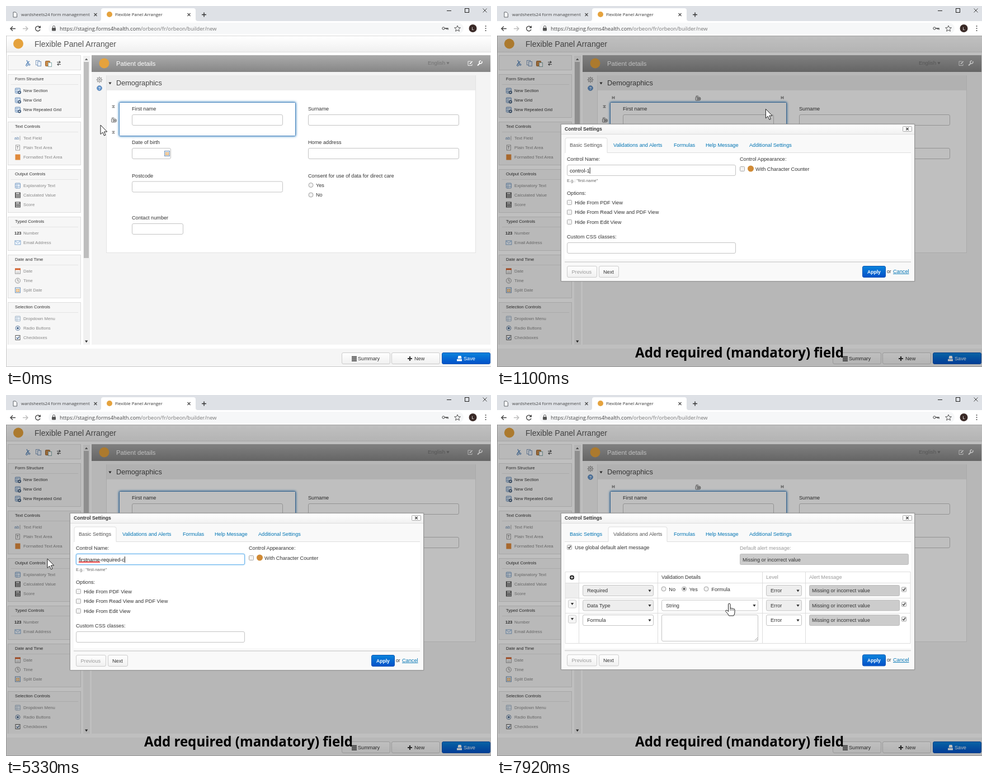
An HTML page that plays this animation: 867 px wide and 646 px high, repeating every 7990 ms.

```html
<!DOCTYPE html>
<html lang="en">
<head>
<meta charset="utf-8">
<title>Form builder</title>
<style>
html, body { margin: 0; width: 867px; height: 646px; overflow: hidden; background: #fff }
svg { display: block; font-family: "Liberation Sans", Arial, sans-serif; white-space: pre }
.ui { font-family: "Open Sans", "Noto Sans", sans-serif }
</style>
</head>
<body>
<svg id="stage" width="867" height="646" viewBox="0 0 867 646"></svg>
<script>
const LOOP = 7990, BODY = 9.16, SMALL = 7.75;
const APP = 'Flexible Panel Arranger', NAME = 'firstname-required-control';

// Drawing helpers; text is placed by its vertical centre.
const text = (x, y, s, size = BODY, fill = '#333', more = '') =>
  `<text x="${x}" y="${y + size * .36}" font-size="${size}" fill="${fill}" ${more}>${s}</text>`;
const rect = (x, y, w, h, fill, stroke = 'none', r = 0, more = '') => {
  const o = stroke === 'none' ? 0 : .5;
  return `<rect x="${x + o}" y="${y + o}" width="${w - 2 * o}" height="${h - 2 * o}" rx="${r}" fill="${fill}" stroke="${stroke}" ${more}/>`;
};
const circle = (x, y, r, fill, stroke = 'none') =>
  `<circle cx="${x}" cy="${y}" r="${r}" fill="${fill}" stroke="${stroke}"/>`;
const path = (d, stroke = '#333', w = 1, fill = 'none', more = '') =>
  `<path d="${d}" stroke="${stroke}" stroke-width="${w}" fill="${fill}" ${more}/>`;
const group = (id, s, more = '') => `<g id="${id}" ${more}>${s}</g>`;
const at = (x, y, s) => `<g transform="translate(${x} ${y})">${s}</g>`;

const input = (x, y, w, h = 20, fill = '#fff') => rect(x, y, w, h, fill, '#c4c4c4', 2.5);
const radio = (x, y) => circle(x, y, 4, '#f2f2f2', '#a3a3a3');
const check = (x, y, on) => rect(x - 4, y - 4, 9, 9, '#f3f3f3', '#a9a9a9', 1) +
  (on ? path(`M${x - 2} ${y + .5}l2 2 3-4.5`, '#444', 1.4) : '');
const down = (x, y, c = '#333') => path(`M${x - 2.6} ${y - 1.5}h5.2l-2.6 4z`, 'none', 0, c);
const select = (x, y, w, label, fill = '#fff') =>
  input(x, y, w, 20, fill) + text(x + 8, y + 10, label) + down(x + w - 7, y + 10);
const button = (x, y, w, label, tx, fill = '#333', more = '') =>
  rect(x, y, w, 21, 'url(#light)', '#ccc', 2.5) + text(tx, y + 10.5, label, BODY, fill, more);
const blueButton = (x, y, w, label, tx, size, more) =>
  rect(x, y, w, 21, 'url(#blue)', '#0a55b5', 2.5) + text(tx, y + 10.5, label, size, '#fff', more);
const cross = (x, y, r, w = 1.1) => path(`M${x - r} ${y - r}l${2 * r} ${2 * r}M${x + r} ${y - r}l${-2 * r} ${2 * r}`, '#444', w);

// Small icons, centred on 0,0.
const sheet = (c = '#6b8fb8') => rect(-5, -5, 10, 10, '#eaf2fb', c, 1) + path('M-5-2.5H5M-1.5-2.5V5M-5 1.5H5', c, .8);
const plusSheet = sheet() + circle(3, 3, 3, '#3d5878') + path('M1.5 3h3M3 1.5v3', '#fff', .9);
const calc = rect(-5, -5, 10, 10, '#666', '#555') + path('M-3-3H3', '#fff', 1.5) + path('M-3 0H4M-3 3H4', '#eee', 1.4, 'none', 'stroke-dasharray="1.6 1"');
const clock = circle(0, 0, 4.5, '#eee', '#999') + path('M0-3V0L2 1.5', '#777', .9);
const calendar = rect(-5, -5, 10, 10, '#fff', '#999') + rect(-5, -5, 10, 3, '#d8642f') + path('M-3 1H3M-3 3H3', '#bbb', .9);
const split = rect(-5, -5, 10, 10, '#dbe9f7', '#7895b4') + rect(-3, -2, 6, 5, '#e6a657') + path('M0-2V3M-3 .5H3', '#fff', .8);
const gear = circle(0, 0, 3.6, '#ddd', '#999') + path('M0-5.5V5.5M-5.5 0H5.5M-4-4L4 4M4-4L-4 4', '#999', 1.3) + circle(0, 0, 2.7, '#e4e4e4') + circle(0, 0, 1.4, '#999');
const bin = rect(-4.5, -2.5, 6, 7, '#eee', '#777', 1) + path('M-3-2.5V-4H1', '#777') + circle(2, 1, 3, '#ccc', '#777') + path('M.5 1h3');
const handle = path('M-2.5-1.8H2.5M-2.5 1.8H2.5', '#666', 1.1) + path('M-1.5-1L1.5 1M1.5-1L-1.5 1', '#888', .8);
const turned = '<g transform="rotate(90)">' + handle + '</g>';
const marks = {
  abc: text(-6, 0, 'ab', 7.5, '#5f83ad') + path('M4-4V4', '#999', .8),
  letter: rect(-4, -5, 8, 10, '#fff', '#999') + text(-2.2, 0, 'T', 7, '#444'),
  square: rect(-4.5, -5, 9, 10, '#e08a3c'),
  digits: text(-6, 0, '123', 7.5, '#333', 'font-weight="bold"'),
  mail: rect(-5.5, -4, 11, 8, '#f2f8ff', '#85a9ce') + path('M-5-3.5L0 1L5-3.5', '#85a9ce'),
  dot: circle(0, 0, 4, '#fff', '#5e7ca0') + circle(0, 0, 2, '#46688f'),
  tick: rect(-4.5, -4.5, 9, 9, '#fff', '#555') + path('M-2 0l2 2 2.5-4', '#3c5f8c', 1.4)
};

function browser() {
  return rect(0, 0, 867, 27, '#dee1e6') + path('M166 27q4 0 4-4V8q0-4 4-4H335q4 0 4 4V23q0 4 4 4z', 'none', 0, '#fff') +
    rect(0, 27, 867, 26, '#fff') + rect(76, 30, 742, 20, '#f6f7f8', 'none', 10) + rect(0, 53, 867, 1, '#d8d8d8') +
    path('M13 11h4l2.5 2.5V20h-6.5z', '#5f6368', 1, '#fff') +
    text(27, 15.5, 'wardsheets24 form management', 7.9, '#444', 'class="ui"') + cross(160, 15.5, 2.5) +
    circle(185, 15, 5, '#e5a23d') + text(195, 15.5, APP, 7.9, '#333', 'class="ui"') + cross(327, 15.5, 2.5) +
    path('M350 15.5h8M354 11.5v8', '#333', 1.4) + path('M788 8.5h8', '#222') + rect(820, 4, 8, 8, 'none', '#222') + cross(856, 8, 3.5, 1) +
    path('M17 40.5H8M12 36.5l-4 4 4 4', '#444', 1.4) + path('M30 40.5h9M35 36.5l4 4-4 4', '#bbb', 1.3) +
    path('M60.5 38A4.3 4.3 0 1 0 61 42', '#444', 1.4) + path('M62 35v4.5h-4.5z', 'none', 0, '#444') +
    rect(82, 39, 7, 5.5, '#555', 'none', 1) + path('M83.5 39v-1.5a2 2 0 0 1 4 0V39', '#555') +
    text(96, 40.5, 'https://staging.forms4health.com<tspan fill="#777">/orbeon/fr/orbeon/builder/new</tspan>', 9.29, '#444', 'class="ui"') +
    circle(782, 40, 2.2, 'none', '#444') + path('M784 40h6v2.5M787.5 40v2', '#444', 1.4) +
    path('M807 35l1.5 3.6 3.9.3-3 2.5 1 3.8-3.4-2-3.4 2 1-3.8-3-2.5 3.9-.3z', '#555') +
    circle(834.5, 40, 7, '#3a2a27') + text(832.4, 40, 'L', 7.5, '#fff') + [36, 40, 44].map(y => circle(857.5, y, 1.1, '#555')).join('');
}

function panel(y, h, title, items, fill = '#888') {
  return rect(3, y, 131, h, '#f6f6f6', '#dedede') + text(16, y + 8.5, title, SMALL) + rect(9, y + 18, 120, 1, '#e4e4e4') +
    items.map(([s, icon], i) => at(21, y + 29.5 + i * 17, icon) + text(31, y + 29 + i * 17, s, SMALL, fill)).join('');
}

function sidebar() {
  return rect(3, 88, 131, 27, '#f6f6f6', '#dedede') +
    path('M37 97l4 8M41.5 99l-5 5', '#4f7fb5', 1.3) + circle(37, 106, 1.5, 'none', '#4f7fb5') + circle(41.5, 105, 1.5, 'none', '#4f7fb5') +
    rect(53, 97, 7, 9, '#fff', '#7d99bc') + rect(56, 99, 7, 9, '#e8f0fa', '#7d99bc') +
    rect(70, 98, 9, 10, '#c98b4a', '#94602c', 1) + rect(75, 101, 7, 8, '#fff', '#8aa') +
    path('M91 100.5h6M95 98.5l2 2-2 2M98 104.5h-6M94 102.5l-2 2 2 2', '#555', 1.2) +
    panel(122, 78, 'Form Structure', [['New Section', plusSheet], ['New Grid', plusSheet], ['New Repeated Grid', plusSheet]], '#333') +
    panel(207, 78, 'Text Controls', [['Text Field', marks.abc], ['Plain Text Area', marks.letter], ['Formatted Text Area', marks.square]]) +
    panel(292, 78, 'Output Controls', [['Explanatory Text', sheet('#7fa0c4')], ['Calculated Value', calc], ['Score', calc]]) +
    panel(377, 61, 'Typed Controls', [['Number', marks.digits], ['Email Address', marks.mail]]) +
    panel(445, 78, 'Date and Time', [['Date', calendar], ['Time', clock], ['Split Date', split]]) +
    panel(530, 90, 'Selection Controls', [['Dropdown Menu', sheet('#a8b8c8')], ['Radio Buttons', marks.dot], ['Checkboxes', marks.tick]]) +
    rect(0, 606, 153, 14, '#fff') + rect(138, 89, 12, 517, '#f1f1f1') + rect(139, 100, 9, 351, '#bdbdbd') +
    path('M141 97l2.7-3.5 2.7 3.5z', 'none', 0, '#666') + down(143.7, 600);
}

const field = (x, y, label, w = 270) => text(x, y, label) + input(x, y + 10, w);

function form() {
  return rect(0, 54, 867, 28, 'url(#light)') + rect(0, 82, 867, 1, '#ddd') + circle(22, 67.5, 9, '#e5a23d') +
    text(51, 67.5, APP, 14.05, '#555') + sidebar() +
    rect(153, 88, 713, 518, '#f4f4f4') + rect(153, 88, 713, 30, 'url(#head)') + circle(175.5, 102.5, 9, '#e5a23d') +
    text(197, 102.5, 'Patient details', 11.2, '#fff') + text(754, 101.5, 'English', BODY + .3, '#727272') + down(790, 102, '#727272') +
    path('M831 99h-5v7.5h7v-3', '#eee') + path('M829 104l4.5-5', '#fff', 1.6) + path('M843 106.5l4-4', '#fff', 2) + path('M850.5 99a2.5 2.5 0 1 1-1.5-1', '#fff', 1.6) +
    rect(179, 124, 661, 318, '#fff', '#e3e3e3') + rect(180, 124, 659, 27, '#ececec') + down(186, 138) + text(197, 137.5, 'Demographics', 12.7, '#444') +
    group('grid', path('M203 173.5H832V427.5H203zM517.5 173V427M203 232.5H832M203 292.5H832M203 367.5H832', '#ddedf6')) +
    rect(202, 172, 316, 61, '#fff', '#4d88bf', 1, 'filter="url(#glow)"') +
    field(225, 184, 'First name') + field(540, 184, 'Surname') + field(225, 244, 'Date of birth', 70) + at(288, 264, split) +
    field(540, 244, 'Home address') + field(225, 303.5, 'Postcode') + field(225, 379, 'Contact number', 92) +
    text(540, 303.5, 'Consent for use of data for direct care') +
    radio(545, 320.5) + text(554, 320.5, 'Yes') + radio(545, 338) + text(554, 338, 'No') +
    group('tools', at(167, 132, gear) + circle(167, 147, 4.5, '#5e92cc', '#7c9cc0') + text(164.8, 147, '?', 7.5, '#fff', 'font-weight="bold"')) +
    group('rows', at(192, 180, handle) + at(192.5, 204, bin) + at(192, 226, handle)) +
    group('columns', at(208, 164, turned) + at(359, 165, bin) + at(510, 164, turned)) +
    group('cell', path('M213.5 181v7M211 186l2.5 3 2.5-3', '#3f8a45', 1.8) + at(213.5, 200.5, bin) +
      text(225, 223, 'Click to add a hint', 7.4, '#aaa') + rect(501, 179, 13, 13, '#d5e6f8', '#73a4d8') + at(507.5, 185.5, gear)) +
    rect(0, 613, 867, 33, '#f5f5f5') +
    button(600, 620, 87, 'Summary', 629) + path('M618 627.5h9M618 630h9M618 632.5h9M618 635h9', '#333', 1.3) +
    button(689, 620, 87, 'New', 730) + path('M718 631h8M722 627v8', '#333', 2.2) +
    blueButton(779, 620, 87, 'Save', 818) + path('M808.5 626h5l1 5h-7z', 'none', 0, '#fff') + rect(806, 632, 9, 3.5, '#fff') +
    path('M.5 53V645.5H867', '#c8c8c8');
}

const TABS = [[130, 'Basic Settings'], [208, 'Validations and Alerts'], [316, 'Formulas'], [373, 'Help Message'], [451, 'Additional Settings']];
const tabs = (active, x, w) => path(`M121 262.5H${x}V239q0-3 3-3h${w - 6}q3 0 3 3V262.5H740`, '#ddd', 1, '#fff') +
  TABS.map(([tx, s], i) => text(tx, 249, s, BODY, i === active ? '#555' : '#0074b3', `id="tab${active}${i}"`)).join('');

function basics() {
  return rect(198, 237, 106, 25, '#eee', 'none', 2, 'id="hover"') + tabs(0, 122, 75) +
    text(125, 274, 'Control Name:') + input(125, 284, 302) +
    rect(125, 284, 302, 20, '#fff', '#6ab4ee', 2.5, 'id="focus" filter="url(#ring)"') +
    rect(130, 289, 36, 11, '#3390f0', 'none', 0, 'id="selection"') + text(130, 294.5, '', BODY, '#333', 'id="typed"') +
    path('M130 299.5' + 'l1-1 1 1'.repeat(19), '#e22', 1.1, 'none', 'id="squiggle"') + rect(0, 289, 1, 11, '#222', 'none', 0, 'id="caret"') +
    text(125, 312.5, 'E.g.: "first-name"', 7.4, '#666') + text(125, 334.5, 'Options:') +
    ['Hide From PDF View', 'Hide From Read View and PDF View', 'Hide From Edit View'].map((s, i) =>
      check(129, 351 + i * 17.5) + text(139, 351.5 + i * 17.5, s)).join('') +
    text(125, 412.5, 'Custom CSS classes:') + input(125, 423, 302) + text(434, 274, 'Control Appearance:') +
    check(438, 291) + circle(453.5, 291, 5.5, '#d08a35') + text(462, 291.5, 'With Character Counter');
}

function validations() {
  const row = (y, label, fill) => select(153, y, 127, label, fill) + select(481, y, 64, 'Error', fill) +
    rect(558, y, 162, 20, '#ccc', '#bdbdbd', 2) + text(563, y + 10, 'Missing or incorrect value') + check(727, y + 7.5, true);
  const opener = y => rect(127, y - 8, 15, 15, '#f5f5f5', '#ccc', 2) + down(134.5, y - 1);
  return tabs(1, 199, 105) + check(129, 272, true) + text(139, 273, 'Use global default alert message') +
    text(434, 274, 'Default alert message:', BODY, '#999') + rect(434, 284, 302, 20, '#ccc', '#bdbdbd', 2) + text(439, 294.5, 'Missing or incorrect value') +
    rect(122, 337, 25, 27, '#eee') + path('M122 316.5H739V444.5H122zM122 336.5H739M122 363.5H739M122 390.5H739M146.5 316V444M287.5 316V444M474.5 316V444M551.5 316V444', '#ddd') +
    circle(134, 326.5, 4, '#222') + path('M131.5 326.5h5M134 324v5', '#fff', 1.2) +
    text(294, 326, 'Validation Details') + text(481, 326, 'Level', BODY, '#999') + text(558, 326, 'Alert Message', BODY, '#999') +
    row(340, 'Required', '#eee') + row(366.5, 'Data Type', '#eee') + row(393, 'Formula') + opener(374.5) + opener(401.5) +
    [[298, 'No'], [334.5, 'Yes'], [374, 'Formula']].map(([x, s]) => radio(x, 347) + text(x + 9.3, 347.5, s)).join('') +
    '<circle id="choice" cy="347" r="2" fill="#555"/>' +
    select(294, 366.5, 173, 'String') + input(294, 393, 173, 48) + path('M461 439l5-5M464 439l2-2', '#888', .8);
}

const footer = rect(121, 457, 619, 2, '#dcdcdc') + button(125, 465, 54, 'Previous', 133.5, '#999') + button(182, 465, 36, 'Next', 190) +
  blueButton(653, 465, 42, 'Apply', 662, 8.6, 'font-weight="bold"') +
  text(697, 474.5, 'or', 8.6) + text(708, 474.5, 'Cancel', BODY, '#0074b3', 'text-decoration="underline"');

const modal = rect(114, 211, 633, 282, '#f9f9f9', '#999', 0, 'id="frame" filter="url(#shade)"') + rect(115, 212, 631, 18, 'url(#light)') +
  rect(115, 229, 631, 1, '#ddd') + text(121, 220, 'Control Settings', 8.6, '#333', 'font-weight="bold"') +
  rect(725, 215, 17, 10, '#fafafa', '#aaa', 1) + cross(733.5, 220, 2.2, 1.3) + rect(121, 262, 619, 191, '#fff') +
  group('basics', basics()) + group('validations', validations()) + group('footer', footer);

const pointers =
  group('arrow', path('M0 0V16.5L3.8 13 6.5 19 9 17.9 6.4 12H11.7z', '#222', 1, '#fff')) +
  group('beam', path('M-2.5-6q2.5 0 2.5 1.5V4.5q0 1.5-2.5 1.5M2.5-6Q0-6 0-4.5V4.5Q0 6 2.5 6', '#222')) +
  group('hand', path('M-1.5 0q0-2 1.7-2T2 0V7q1.5-1.5 3 .2 1.8-1 2.8.6 2.2-.6 2.2 1.8V14q0 3-2 6H-.5Q-2 16-6 12.5q-1-2 1-2.5 2 .2 3.5 2.5z', '#222', 1, '#fff') +
    path('M2 7v4M5 8v3M7.8 9v2', '#222', .8));

const gradient = (id, a, b) => `<linearGradient id="${id}" x2="0" y2="1"><stop stop-color="${a}"/><stop offset="1" stop-color="${b}"/></linearGradient>`;
const shadow = (id, dy, blur, color) => `<filter id="${id}" x="-20%" y="-50%" width="140%" height="200%"><feDropShadow dx="0" dy="${dy}" stdDeviation="${blur}" flood-color="${color}"/></filter>`;

stage.innerHTML = '<defs>' + gradient('light', '#fff', '#f0f0f0') + gradient('blue', '#0a84dc', '#0350c8') + gradient('head', '#ababab', '#868686') +
  shadow('glow', 0, 2.2, '#1f6fb8') + shadow('ring', 0, 1.3, '#7cc0f2') + shadow('shade', 0, 1, '#8888') + '</defs>' +
  rect(0, 0, 867, 646, '#fff') + browser() + form() + rect(0, 53, 867, 593, '#000', 'none', 0, 'id="dim" opacity=".25"') + group('modal', modal) +
  group('caption', '<text class="ui" x="247" y="629" font-size="24.12" font-weight="bold">Add required (mandatory) field</text>') + group('pointer', pointers);

const $ = id => document.getElementById(id);
const show = (id, on) => $(id).style.display = on ? '' : 'none';
const ramp = (t, a, b) => Math.min(1, Math.max(0, (t - a) / (b - a)));

// Pointer way-points: time, x, y.
const WAY = [[0, 169, 213], [40, 170, 213], [400, 345, 205], [780, 499, 187], [1060, 491, 184], [1100, 481, 184], [1380, 310, 270],
  [1600, 185, 294], [1700, 172, 294], [2000, 63, 292], [2120, 74, 293], [6460, 74, 293], [6740, 234, 249], [6860, 234, 249],
  [7230, 332, 325], [7440, 336, 346], [7580, 336, 346], [7920, 415, 375], [LOOP, 415, 375]];
// Moments at which a further character of the name is in place; two at once where typed fast.
const KEYS = [2550, 2650, 2810, 2810, 2930, 3200, 3290, 3380, 3460, 3620, 3780, 3840, 4090, 4330, 4430, 4430, 4530, 4900,
  5090, 5330, 5410, 5490, 5650, 5720, 5800, 5870];

function pointerAt(t) {
  const i = WAY.findIndex(w => w[0] > t), [a, x, y] = WAY[i - 1], [b, u, v] = WAY[i], k = (t - a) / (b - a);
  return [x + (u - x) * k, y + (v - y) * k];
}

function draw(t) {
  const [x, y] = pointerAt(t), open = t >= 1100, second = t >= 6840, inGrid = t >= 160 && t < 1080;
  const away = t >= 1720 && t < 6560;
  show('grid', inGrid); show('cell', inGrid); show('tools', !away); show('rows', t < 1720);
  show('columns', t >= 160 && !away); show('dim', open); show('modal', open);
  $('caption').style.opacity = ramp(t, 40, 540);

  show('basics', !second); show('validations', second);
  $('frame').setAttribute('height', second ? 280 : 281);
  $('footer').setAttribute('transform', `translate(0 ${second ? -.7 : 0})`);
  const hover = t >= 6680;
  show('hover', hover);
  $('tab01').setAttribute('fill', hover ? '#005580' : '#0074b3');
  $('focus').style.opacity = ramp(t, 1110, 1400) * (1 - .6 * ramp(t, 6720, 6840));

  const count = KEYS.filter(k => k <= t).length, typed = $('typed');
  const label = count ? NAME.slice(0, count) : 'control-1';
  if (typed.textContent !== label) typed.textContent = label;
  const selecting = t >= 1700 && !count, from = Math.min(166, Math.max(130, x));
  show('selection', selecting);
  $('selection').setAttribute('x', from);
  $('selection').setAttribute('width', 166 - from);
  typed.setAttribute('fill', selecting && from < 148 ? '#fff' : '#222');
  show('squiggle', count >= 10 && t < 6700);
  show('caret', t < 6240 && !selecting);
  if (open && !second) $('caret').setAttribute('x', 130 + typed.getComputedTextLength());
  $('choice').setAttribute('cx', t < 7500 ? 298 : 334.5);

  const hand = (t >= 6680 && t < 6900) || t >= 7250;
  const beam = open && t < 2120 && x > 125 && x < 427 && y > 284 && y < 304;
  show('hand', hand); show('beam', beam); show('arrow', !hand && !beam);
  $('pointer').setAttribute('transform', `translate(${x} ${y})`);
}

(function tick() {
  draw(performance.now() % LOOP);
  requestAnimationFrame(tick);
})();
</script>
</body>
</html>
```
